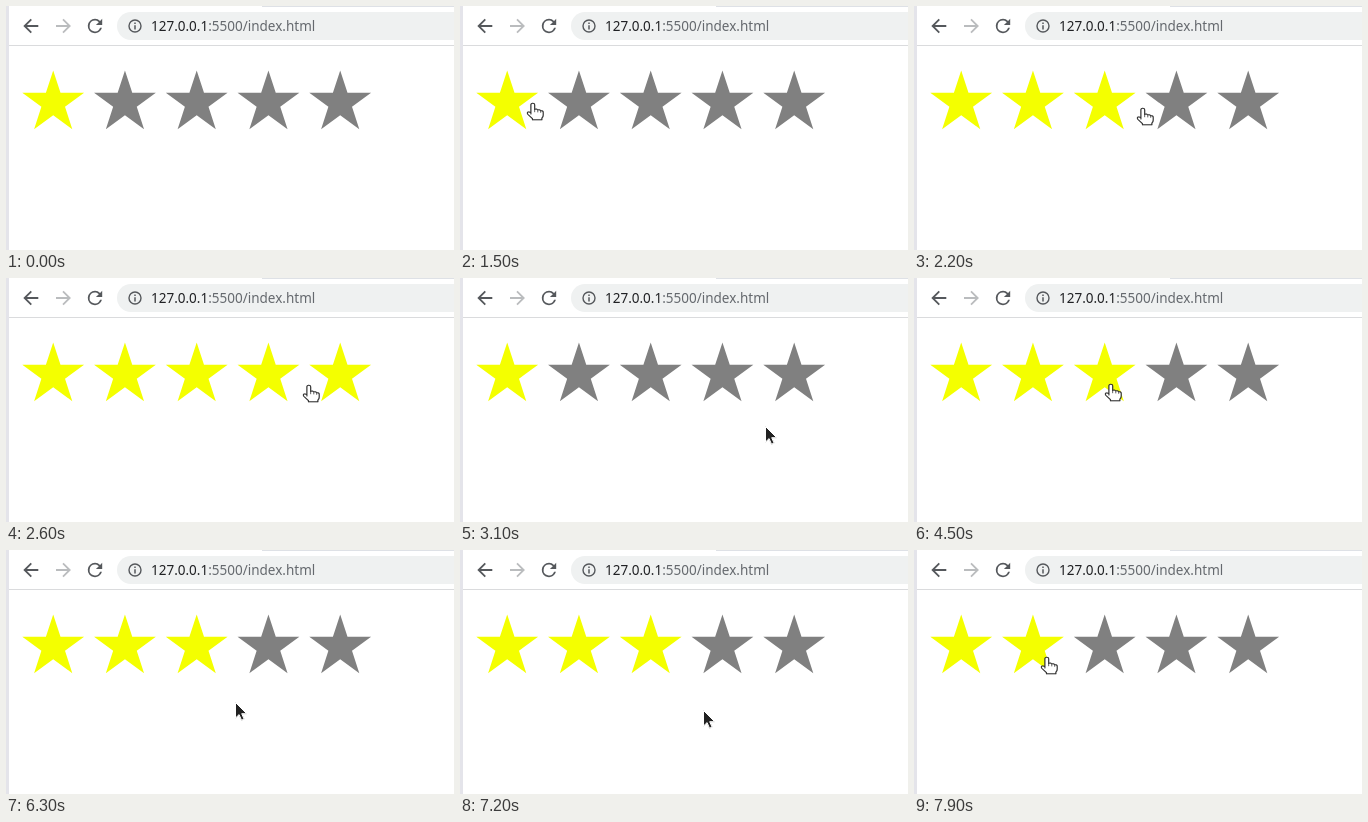
These frames come from a looping animation (448 px wide and 244 px high, 8000 ms). An HTML page:

```html
<!DOCTYPE html>
<html lang="en">
<head>
<meta charset="utf-8">
<title>Star rating</title>
<style>
  html, body { margin: 0; width: 100%; height: 100%; overflow: hidden; background: #fff; }
  svg { display: block; width: 448px; height: 244px; }
  text { font: 13.5px "Noto Sans", "Open Sans", sans-serif; fill: #65696e; }
  .host { fill: #202124; font-weight: 500; }
  .icon { fill: none; stroke: #55585c; stroke-width: 1.8; }
  .star { fill: #808080; }
  .star.on { fill: #f4ff00; }
  #cursor { filter: drop-shadow(.5px .8px .7px rgba(0, 0, 0, .3)); }
  #arrow { fill: #222; stroke: #fff; stroke-width: 1; }
  #hand { fill: #fff; stroke: #333; stroke-width: 1.1; stroke-linejoin: round; }
</style>
</head>
<body>
<svg viewBox="0 0 448 244">
  <rect width="3" height="244" fill="#e4e4ea"/>
  <rect x="256" width="192" height="1" fill="#dee1e6"/>
  <rect x="3" y="39" width="445" height="1" fill="#dadbdd"/>
  <rect x="111" y="6" width="370" height="28" rx="14" fill="#eff1f1"/>

  <path class="icon" d="M32.3 20H19.3M25.3 13.3L18.6 20L25.3 26.7"/>
  <path class="icon" style="stroke:#babcbe" d="M50 20H63M57 13.3L63.7 20L57 26.7"/>
  <path transform="translate(78.2 9.2) scale(.9)" fill="#55585c"
    d="M17.65 6.35A7.96 7.96 0 0 0 12 4a8 8 0 1 0 7.73 10h-2.08A6 6 0 1 1 12 6c1.66 0 3.14.69 4.22 1.78L13 11h7V4z"/>
  <circle class="icon" style="stroke-width:1.4" cx="129" cy="20" r="6"/>
  <path class="icon" style="stroke-width:1.5" d="M129 16.4v1.6M129 19.2v4.3"/>
  <text x="145" y="25"><tspan class="host">127.0.0.1</tspan>:5500/index.html</text>

  <g id="stars"></g>

  <g id="cursor">
    <path id="arrow" d="M.5 .5V16l3.6-3.4 2.4 5.6 2.6-1.1-2.4-5.4h5z"/>
    <g id="hand" transform="scale(1.04 .92)">
      <path d="M-2 12V2a1.8 1.8 0 0 1 3.6 0V7q1.7-1 3 .6q1.8-.7 2.8 .8q2.4-.4 2.4 2V13q0 2-1.3 3.5V18.2H-.5V17L-5 12.2q-1-1.6 .4-2.4q1.3-.5 2.6 1z"/>
      <path d="M1.6 7v3M4.6 7.8v2.4M7.4 8.6v2" stroke-width=".8"/>
    </g>
  </g>
</svg>
<script>
  const LOOP = 8000, STEP = 100, ENTER = 700, CLICK = 4500, PITCH = 71.75;
  const $ = id => document.getElementById(id);

  // Each leg starts where the last one ended; (bx, by) bows it sideways.
  const legs = [];
  let last = { x: 77, y: 17 };
  function move(from, to, x, y, bx = 0, by = 0) {
    legs.push({ from, to, start: last, end: last = { x, y }, bow: { x: bx, y: by } });
  }
  move(ENTER, 900, 39, 77);
  move(1000, 1200, 38, 95);
  move(1300, 2200, 229, 102, -11);        // across three stars
  move(2200, 2800, 340, 109);             // on to the fifth
  move(2900, 3800, 206, 139, -8, 50);     // swing out below the row
  move(3800, CLICK, 197, 106);            // pick the third
  move(5900, 6300, 229, 152);
  move(6400, 6600, 262, 195);
  move(7000, 7200, 243, 160);
  move(7300, 7400, 208, 121);
  move(7500, 7900, 133, 107);

  function pointer(t) {
    const leg = legs.findLast(l => l.from <= t);
    const k = Math.min((t - leg.from) / (leg.to - leg.from), 1);
    const at = c => Math.round(
      leg.start[c] + (leg.end[c] - leg.start[c]) * k + leg.bow[c] * Math.sin(Math.PI * k));
    return [at("x"), at("y")];
  }

  function starPoints(cx, cy, r) {
    return Array.from({ length: 10 }, (_, i) => {
      const a = i * Math.PI / 5, d = i % 2 ? r * .382 : r;
      return `${cx + d * Math.sin(a)},${cy - d * Math.cos(a)}`;
    }).join(" ");
  }

  const stars = Array.from({ length: 5 }, (_, i) => {
    const s = document.createElementNS("http://www.w3.org/2000/svg", "polygon");
    s.setAttribute("points", starPoints(47.2 + i * PITCH, 96.9, 32.5));
    return $("stars").appendChild(s);
  });

  function draw(now) {
    const t = Math.floor(now % LOOP / STEP) * STEP;
    const visible = t >= ENTER;
    const [x, y] = visible ? pointer(t) : [0, 0];
    const hover = visible && y > 55 && y < 138;
    const chosen = t < CLICK ? 1 : 3;
    const rating = hover ? 1 + Math.floor((x - 16) / PITCH) : chosen;

    stars.forEach((s, i) => s.setAttribute("class", i < rating ? "star on" : "star"));
    $("cursor").setAttribute("transform", `translate(${x} ${y})`);
    $("cursor").style.display = visible ? "" : "none";
    $("hand").style.display = hover ? "" : "none";
    $("arrow").style.display = hover ? "none" : "";
  }

  const start = performance.now();
  function tick() {
    draw(performance.now() - start);
    requestAnimationFrame(tick);
  }
  tick();
</script>
</body>
</html>
```
